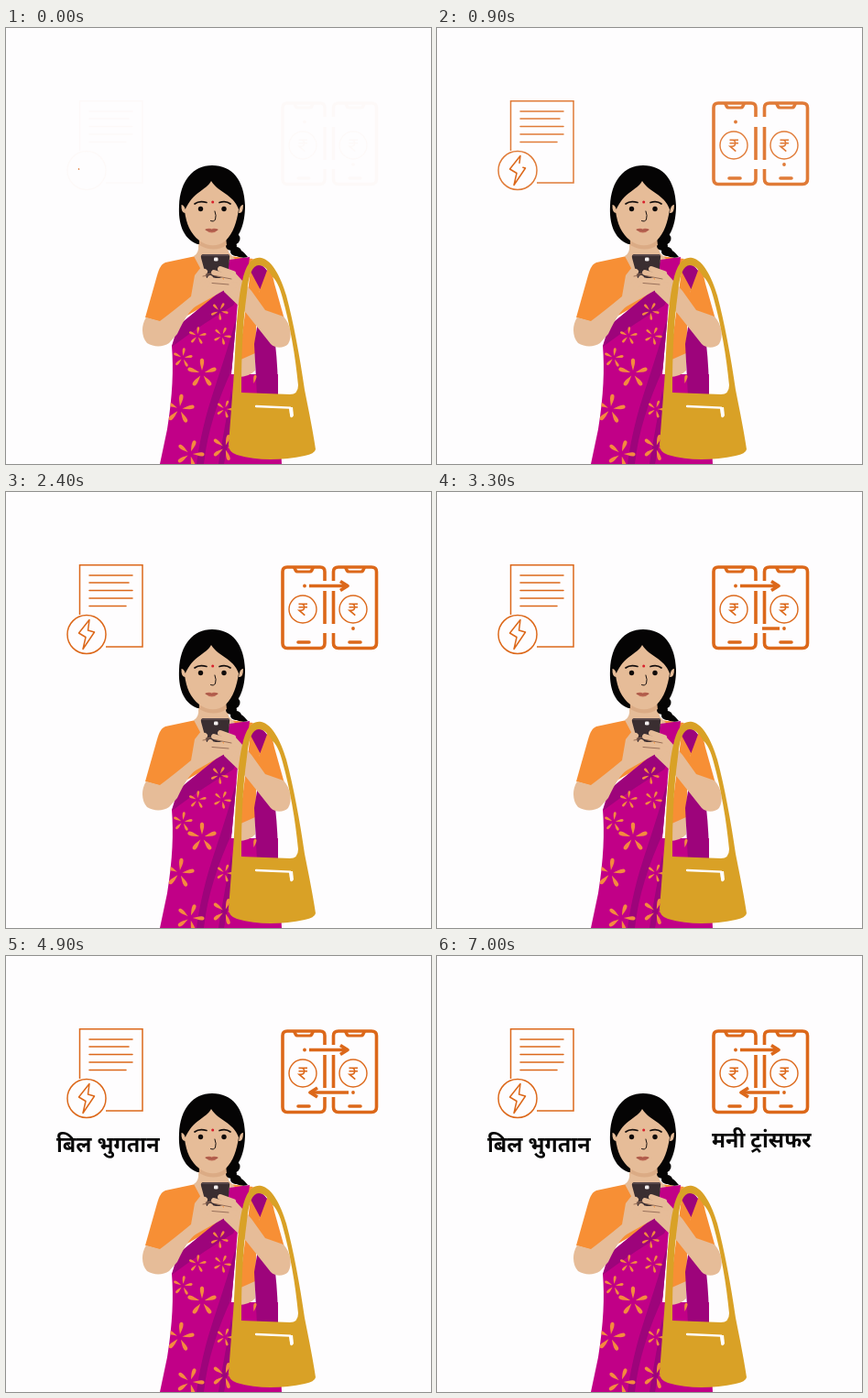
Recreate the animation shown at these times as an HTML page. Size 464x476 px, loop 8000 ms.

```html
<!DOCTYPE html>
<html lang="hi">
<head>
<meta charset="utf-8">
<title>बिल भुगतान, मनी ट्रांसफर</title>
<style>
  html, body { margin: 0; width: 100%; height: 100%; overflow: hidden; background: #fefdfe; }
  svg { display: block; width: 464px; height: 476px; }
  .line { fill: none; stroke: #dc681a; stroke-width: 1.5; }
  .thick { stroke-width: 3.6; }
  .round { stroke-linecap: round; stroke-linejoin: round; }
  .dot { fill: #dc681a; }
  .skin { fill: #e6bc98; }
  .blouse { fill: #f78f35; }
  .sari { fill: #c10087; }
  .fold { fill: #9d047b; }
  .bag { fill: #d9a126; }
  .petals { fill: #f48a3f; }
  .fingers { fill: none; stroke: #e6bc98; stroke-width: 6; stroke-linecap: round; }
  .crease { fill: none; stroke: #8f6753; stroke-width: .9; stroke-linecap: round; }
  text { font: 700 23.3px "Noto Sans", "Noto Sans Devanagari", sans-serif; fill: #080808; }

  .fade, .bolt, .wipe { animation: 8s linear infinite; }
  .fade { animation-name: fade; }
  .bolt { animation-name: draw; }
  .send { animation-name: send; }
  .reply { animation-name: reply; }
  .bill { animation-name: bill; }
  .money { animation-name: money; }
  @keyframes fade { 0% { opacity: .02; } 13%, 100% { opacity: 1; } }
  @keyframes draw {
    0% { stroke-dasharray: 0 100 0 0; }
    12.5%, 100% { stroke-dasharray: 36 0 64 0; }
  }
  @keyframes send { 0%, 12.5% { transform: scaleX(0); } 30%, 100% { transform: scaleX(1); } }
  @keyframes reply { 0%, 33.75% { transform: scaleX(0); } 51.25%, 100% { transform: scaleX(1); } }
  @keyframes bill { 0%, 45% { transform: scaleX(0); } 59.05%, 100% { transform: scaleX(1); } }
  @keyframes money { 0%, 63.75% { transform: scaleX(0); } 78.25%, 100% { transform: scaleX(1); } }
</style>
</head>
<body>
<svg viewBox="0 0 464 476">
  <defs>
    <path id="petal" d="M0 -3C-1 -7 -2.7 -11 -2.1 -14.500C-1.400 -17 1.400 -17 2.100 -14.500C2.700 -11 1 -7 0 -3Z"/>
    <g id="flower">
      <use href="#petal"/>
      <use href="#petal" transform="rotate(72)"/>
      <use href="#petal" transform="rotate(144)"/>
      <use href="#petal" transform="rotate(216)"/>
      <use href="#petal" transform="rotate(288)"/>
    </g>
    <g id="arrow" class="line">
      <path class="thick" d="M0 0H41"/>
      <path class="thick" d="M34 -5L42 0L34 5" stroke-linejoin="round"/>
    </g>
    <g id="coin" class="line">
      <circle r="15" stroke-width="1.4"/>
      <path stroke-width="1.6" d="M-4.500 -5.700H5M-4.500 -2.300H5M-4.500 -5.700H-2C2.900 -5.700 2.900 1.200 -2 1.200H-4L2.300 6.700"/>
    </g>
    <path id="robe" d="M244 253L266 250L262 282L253 300L246 378H297V400L301 476H168L176 438C182 401 183 372 181 347L188 325L236 286Z"/>
    <clipPath id="robeClip"><use href="#robe"/></clipPath>
    <clipPath id="sendClip"><rect class="wipe send" y="-9" width="44" height="18"/></clipPath>
    <clipPath id="replyClip"><rect class="wipe reply" y="-9" width="44" height="18"/></clipPath>
    <clipPath id="billClip"><rect class="wipe bill" y="-30" width="118" height="46"/></clipPath>
    <clipPath id="moneyClip"><rect class="wipe money" y="-30" width="114" height="46"/></clipPath>
  </defs>

  <!-- bill -->
  <g class="line fade">
    <path d="M80.500 134V79.700H149V169H109"/>
    <path d="M91 91H138M91 99H134M91 107.500H138M91 116H138M91 124.500H131" stroke-linecap="round"/>
    <circle cx="88" cy="155.500" r="21"/>
  </g>
  <path class="line round bolt" pathLength="100" d="M79.500 154L91 139.500L89.500 151L96.500 153L84 171.500L87 158.500Z"/>

  <!-- phones -->
  <g class="fade">
    <g class="line thick">
      <path d="M348 97V87Q348 82 343 82H307Q302 82 302 87V165Q302 170.500 307 170.500H343Q348 170.500 348 165V154M348 108V144"/>
      <path d="M357.500 97V87Q357.500 82 363 82H399Q404.500 82 404.500 87V165Q404.500 170.500 399 170.500H363Q357.500 170.500 357.500 165V154M357.500 108V144"/>
      <path class="round" d="M319 164H331M375 164H387"/>
    </g>
    <path class="dot" d="M312 81H338L335 87Q334 88.500 332 88.500H318Q316 88.500 315 87ZM368 81H394L391 87Q390 88.500 388 88.500H374Q372 88.500 371 87Z"/>
    <path fill="#fefdfe" d="M317 83.700H333L331.500 85.500H318.500ZM373 83.700H389L387.500 85.500H374.500Z"/>
    <use href="#coin" x="324" y="128"/>
    <use href="#coin" x="379" y="128"/>
    <circle class="dot" cx="326" cy="102.500" r="1.900"/>
    <circle class="dot" cx="379" cy="149" r="1.900"/>
  </g>
  <g transform="translate(331 102.500)" clip-path="url(#sendClip)"><use href="#arrow"/></g>
  <g transform="translate(374 149) rotate(180)" clip-path="url(#replyClip)"><use href="#arrow"/></g>

  <!-- labels -->
  <g transform="translate(55 214)" clip-path="url(#billClip)"><text>बिल भुगतान</text></g>
  <g transform="translate(300 209)" clip-path="url(#moneyClip)"><text>मनी ट्रांसफर</text></g>

  <!-- clothes -->
  <path class="blouse" d="M207 249L174 256C169 258 167 263 165 270L152 316L180 324L240 290L270 252L244 249Z"/>
  <path class="skin" d="M210 222H240L243 245L250 252L232 280L214 266L205 249Q211 246 210 236Z"/>
  <use href="#robe" class="sari"/>
  <path class="blouse" d="M267 264H282L274 300L272 360L254 366Z"/>
  <path class="skin" d="M254 363L272 355V374Q265 381 254 381Z"/>
  <path class="fold" d="M265 262Q276 252 286 266L290 310L294 345Q297 372 297 402H274L271 345L280 290Z"/>
  <g clip-path="url(#robeClip)">
    <path class="fold" d="M181 348L188 325L236 283L256 288L248 303Q216 322 181 348Z"/>
    <path class="fold" d="M256 300C244 345 234 374 224 405C216 430 211 454 208 476H216C220 440 231 407 247 372Z"/>
    <path class="fold" d="M246 395C241 425 236 450 232 476H238L249 420Z"/>
    <g class="petals">
      <use href="#flower" transform="translate(214 377)"/>
      <use href="#flower" transform="translate(189.500 416) rotate(8)"/>
      <use href="#flower" transform="translate(193 360) rotate(8) scale(.66)"/>
      <use href="#flower" transform="translate(209 336) rotate(6) scale(.6)"/>
      <use href="#flower" transform="translate(236 336) rotate(24) scale(.6)"/>
      <use href="#flower" transform="translate(233 309) rotate(30) scale(.6)"/>
      <use href="#flower" transform="translate(201 465) rotate(20) scale(.95)"/>
      <use href="#flower" transform="translate(239 416) rotate(20) scale(.6)"/>
      <use href="#flower" transform="translate(239 458) rotate(18) scale(.9)"/>
      <use href="#petal" transform="translate(270 390) rotate(12) scale(.7)"/>
    </g>
  </g>
  <path class="blouse" d="M286 262Q291 268 293 279L304 318L288 318L273 297Z"/>

  <!-- arms and phone -->
  <path class="skin" d="M153 316C147 325 148 338 154 344C162 349 172 348 178 344L187 334Q198 310 207 304L237 287L243 280L226 263L213 261L206 270L202 293Q184 308 168 320Z"/>
  <path class="skin" d="M303 315C311 324 313 337 308 345C303 350 294 350 289 345L262 311L238 288L238 265L250 267L268 287L283 308Z"/>
  <path fill="#3a2e31" d="M216 247H241Q245 247 244 251L242 273H219L213 251Q212 247 216 247Z"/>
  <path fill="#5a4a4c" d="M217 247H241Q244 247 244 249H213Q214 247 217 247Z"/>
  <rect x="227" y="250.500" width="4.500" height="4" rx="1.200" fill="#f2eeee"/>
  <path class="fingers" d="M210 276L217 266M217 283L223 273"/>
  <path class="fingers" d="M248 268L234 263M252 275L227 267M250 281L224 275M246 285L227 282"/>
  <path class="crease" d="M246 274L228 270.500M243 280L225 278.500M218 269L224 268M215 271L221 270"/>

  <!-- bag -->
  <path class="bag" d="M247 402C251 363 250 310 258 276C262 257 269 249 279 251C291 254 300 272 306 292C314 322 321 360 326 395C331 420 335 440 338 460Q337 465 326 467C302 472 275 473 252 466Q243 463 243 455ZM257 398L310 400Q319 400 319 390C316 358 310 324 302 295C299 283 295 275 291 272Q284 259 276 259C269 259 265 269 263 289C258 325 257 360 257 398Z" fill-rule="evenodd"/>
  <path d="M273 413L310 414.500L311.500 424" fill="none" stroke="#fefdfe" stroke-width="2.300" stroke-linecap="round"/>
  <path d="M309.500 414H313L314 423Q312 427 310 423Z" fill="#fefdfe"/>

  <!-- head -->
  <g fill="#050404">
    <path d="M225 150C204 150 190 167 189 194C188 213 193 230 209 236H243C255 230 261 214 261 194C260 166 247 150 225 150Z"/>
    <circle cx="249" cy="230" r="6.500"/>
    <ellipse cx="246" cy="238" rx="6" ry="5"/>
    <ellipse cx="251" cy="244" rx="6" ry="5"/>
    <path d="M250 240Q258 242 264 250Q257 252 249 248Z"/>
  </g>
  <path fill="#dbab85" d="M211 229H240L241 237Q227 246 211 237Z"/>
  <path class="skin" d="M191.500 193Q195 193 197 202Q191 203 191.500 193ZM259 193Q255 193 254 202Q259 203 259 193Z"/>
  <path class="skin" d="M224 167C218 178 204 178 195 200C197 214 201 224 211 232C220 239 232 239 240 232C248 224 252 212 254 198C248 181 232 180 224 167Z"/>
  <g fill="none" stroke="#16100e" stroke-linecap="round">
    <path d="M206 192Q211 188 219 190.500M233 190.500Q240 188 245 192" stroke-width="1.700"/>
    <path d="M228 200Q230 205 228.500 209Q227 212 223.500 210.500" stroke-width="1"/>
  </g>
  <circle cx="212.500" cy="197.500" r="2.700" fill="#100b0a"/>
  <circle cx="238" cy="197.500" r="2.700" fill="#100b0a"/>
  <circle cx="225.700" cy="190" r="1.500" fill="#d8202b"/>
  <path fill="#bd6754" d="M217 220Q222 218 224.500 219.500Q227 218 232 220Q225 227 217 220Z"/>
  <path d="M218 220.300Q225 222 231 220.300" fill="none" stroke="#94483b" stroke-width=".7"/>
</svg>
</body>
</html>
```
